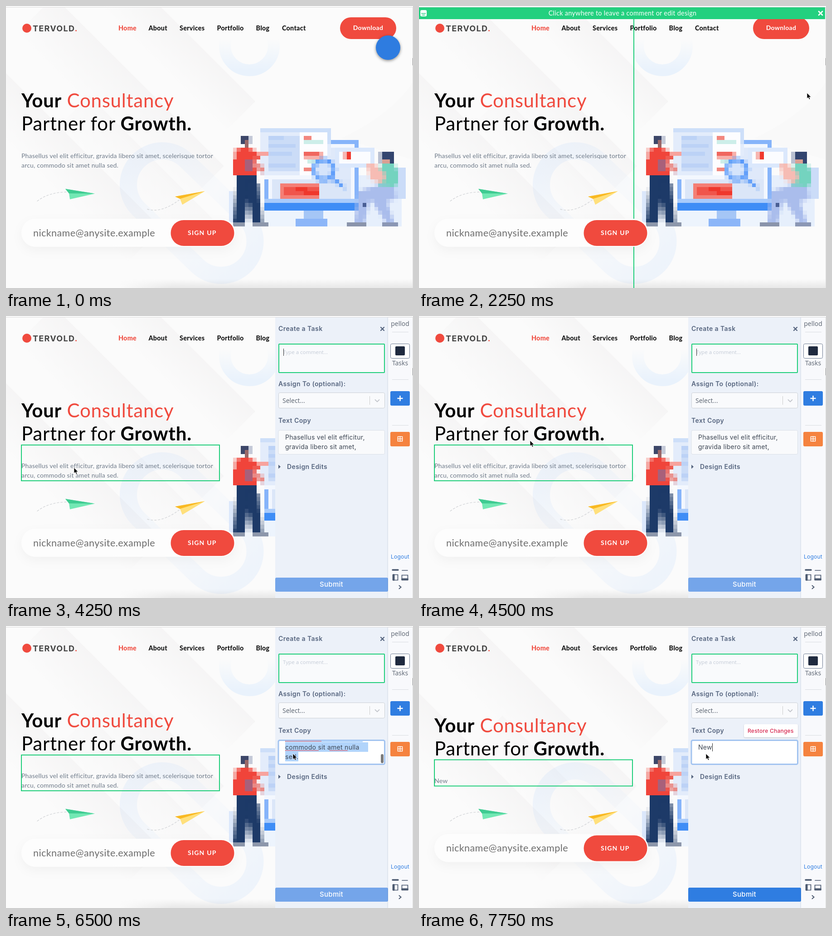
These frames come from a looping animation (898x623 px, 8000 ms). An HTML page with a canvas:

```html
<!DOCTYPE html>
<html lang="en">
<head>
<meta charset="utf-8">
<title>Consultancy page review</title>
<style>
  html, body { margin: 0; width: 100%; height: 100%; overflow: hidden; background: #fbfbfb; }
  #stage { position: absolute; left: 0; top: 0; width: 898px; height: 623px; overflow: hidden; }
  svg, canvas { position: absolute; left: 0; top: 0; }
  canvas { left: 492px; top: 270px; width: 390px; height: 216.67px; image-rendering: pixelated; }
  text { font: 14px Lato, sans-serif; letter-spacing: .02em; white-space: pre; }
  .bold { font-weight: 700; }
  .nav text { font-weight: 800; font-size: 14.3px; fill: #111; }
  .title { font-size: 42px; letter-spacing: .018em; fill: #000; }
  .para { letter-spacing: .014em; fill: #6f7b8a; }
  .ui { font: 14px Inter, sans-serif; letter-spacing: .02em; fill: #3d4653; }
  .label { font: 600 14px Inter, sans-serif; letter-spacing: .03em; fill: #56657f; }
  .plain { font: 14px "Open Sans", sans-serif; letter-spacing: 0; fill: #59626f; }
  .line { fill: none; stroke-linecap: round; }
  .green { fill: none; stroke: #1fce7a; stroke-width: 2; }
</style>
</head>
<body>
<div id="stage">
  <svg width="898" height="623">
    <defs>
      <linearGradient id="fade" x2="0" y2="1">
        <stop stop-color="#85757c" stop-opacity=".045"/><stop offset="1" stop-color="#85757c" stop-opacity="0"/>
      </linearGradient>
      <linearGradient id="rise" x2="0" y2="1">
        <stop offset=".35" stop-color="#e9f2fc" stop-opacity="0"/><stop offset="1" stop-color="#e9f2fc"/>
      </linearGradient>
      <linearGradient id="ends">
        <stop stop-color="#ebf2fb"/><stop offset=".5" stop-color="#ebf2fb" stop-opacity=".25"/>
        <stop offset="1" stop-color="#ebf2fb"/>
      </linearGradient>
      <linearGradient id="floor" x2="0" y2="1">
        <stop stop-color="#999" stop-opacity="0"/><stop offset="1" stop-color="#999" stop-opacity=".2"/>
      </linearGradient>
      <linearGradient id="floorEdge">
        <stop stop-color="#fbfbfb"/><stop offset="1" stop-color="#fbfbfb" stop-opacity="0"/>
      </linearGradient>
    </defs>
    <rect width="898" height="623" fill="#fbfbfb"/>
    <g class="line">
      <circle cx="537" cy="88" r="54" stroke="url(#rise)" stroke-width="26"/>
      <rect x="-75" y="-75" width="330" height="150" rx="75" stroke="url(#ends)" stroke-width="38"
        opacity=".8" transform="translate(345 395) rotate(44)"/>
    </g>
    <g transform="rotate(45)" fill="url(#fade)">
      <rect x="0" y="-240" width="538" height="95"/>
      <rect x="60" y="-90" width="530" height="120"/>
      <rect x="90" y="105" width="500" height="110"/>
      <rect x="270" y="10" width="390" height="100" opacity=".7"/>
    </g>
    <path d="M898 168Q850 240 740 292L898 340Z" fill="#85809a" opacity=".018"/>
    <rect x="250" y="603" width="648" height="20" fill="url(#floor)"/>
    <rect x="249" y="603" width="120" height="20" fill="url(#floorEdge)"/>
    <rect width="898" height="2" fill="#fff"/>
    <path d="M0 2.5H898" stroke="#d9d9d9"/>

    <circle cx="46" cy="49" r="10" fill="#f04a3e"/>
    <text x="59" y="56" style="font:700 18px Inter,sans-serif;letter-spacing:1.3px" fill="#444">TERVOLD<tspan fill="#f04a3e">.</tspan></text>
    <g class="nav" id="nav"></g>
    <rect x="737" y="25" width="124" height="48" rx="24" fill="#f04a3e"/>
    <text class="bold" x="799" y="53" text-anchor="middle" fill="#fff">Download</text>

    <g id="heading">
      <text class="title" x="34" y="224"><tspan class="bold">Your</tspan> <tspan fill="#f04a3e">Consultancy</tspan></text>
      <text class="title" x="34" y="275">Partner for <tspan class="bold">Growth.</tspan></text>
    </g>
    <text class="para" id="para1" x="34" y="336"></text>
    <text class="para" id="para2" x="34" y="357">arcu, commodo sit amet nulla sed.</text>

    <g class="line" stroke="#d3d5d8" stroke-width="1.3" stroke-dasharray="4 4">
      <path d="M69 431Q95 411 135 411"/><path d="M312 449Q344 458 384 427"/>
    </g>
    <path d="M131 404L196 414.500L141 427L139 414Z" fill="#72e8b4"/>
    <path d="M131 404L196 414.500L139 414Z" fill="#3fcb92"/>
    <path d="M373 421L439 409L389 439L384 426Z" fill="#ffe07c"/>
    <path d="M373 421L439 409L384 426Z" fill="#f9b923"/>
    <path id="split" d="M474 29V623" class="green"/>
  </svg>

  <canvas id="mosaic" width="45" height="25"></canvas>

  <svg width="898" height="623">
    <g id="form">
      <rect x="34" y="470" width="472" height="62" rx="31" fill="#fdfdfd" style="filter:drop-shadow(0 8px 11px rgba(0,0,0,.04))"/>
      <rect x="363.500" y="473" width="140" height="57" rx="28.500" fill="#f04a3e"/>
      <text x="60" y="508.500" style="font-size:21.500px" fill="#6c6c6c">nickname@anysite.example</text>
      <text class="bold" x="401" y="506" style="letter-spacing:1.200px" fill="#fff">SIGN UP</text>
    </g>
    <rect id="outline" class="green" x="34" width="437"/>

    <g id="banner">
      <rect y="3" width="896" height="26" fill="#23d07f"/>
      <text x="449" y="21" text-anchor="middle" style="font-size:14.400px" fill="#fff">Click anywhere to leave a comment or edit design</text>
      <rect x="3" y="9" width="14" height="14" rx="3" fill="#fff"/>
      <path d="M5 16.500H15M7 20H13" stroke="#23d07f" stroke-width="1.500"/>
      <path d="M882 12L890 20M890 12L882 20" class="line" stroke="#fff" stroke-width="2.800"/>
    </g>

    <g id="panel">
      <rect x="594" y="3" width="249" height="620" fill="#ecf1f9"/>
      <text class="label" x="601" y="33">Create a Task</text>
      <path d="M827 25L834 32M834 25L827 32" class="line" stroke="#56657f" stroke-width="2.400"/>
      <rect class="green" x="602" y="62" width="233" height="63" rx="1" style="fill:#f9fafc"/>
      <text class="plain" x="611" y="84" style="font-size:11.600px;fill:#c3cad6">Type a comment...</text>
      <path id="commentCaret" d="M612.500 72V88" stroke="#333"/>
      <text class="label" x="601" y="155">Assign To (optional):</text>
      <rect x="601.500" y="169.500" width="234" height="34" rx="3" fill="#f9fafc" stroke="#ccd0d6"/>
      <text class="plain" x="610" y="192">Select...</text>
      <path d="M802.500 177V196" stroke="#ccc"/>
      <path d="M814.500 185L819 189.500L823.500 185" class="line" stroke="#c3c6cc" stroke-width="1.800"/>
      <text class="label" x="601" y="236">Text Copy</text>
      <g id="restore">
        <rect x="717" y="217" width="119" height="29" rx="3" fill="#fff" style="filter:drop-shadow(0 1px 1px rgba(0,0,0,.2))"/>
        <text class="ui" x="725" y="236" style="font-size:12px;font-weight:500;letter-spacing:.02em;fill:#d6254d">Restore Changes</text>
      </g>
      <rect id="copyBox" x="601" y="252.500" width="234.500" height="53" rx="3"/>
      <g id="selection" fill="#b1d4fb">
        <path id="selectTop" d="M616 253H787V256.500H616Z"/>
        <rect x="616" y="257" width="183" height="21"/>
        <rect id="selectLow" x="616" y="278" height="21"/>
      </g>
      <text class="ui" id="copy1" x="616" y="273"></text>
      <text class="ui" id="copy2" x="616" y="294"></text>
      <path id="spelling" class="line" stroke="#e5484d" stroke-width="2" stroke-dasharray="0.1 3"/>
      <path id="copyCaret" d="M647.500 259V277" stroke="#222"/>
      <rect id="thumb" x="827" y="283" width="6" height="20" rx="3" fill="#7b7b7b"/>
      <path d="M601 328.500L606 333L601 337.500Z" fill="#56657f"/>
      <text class="label" x="620" y="338">Design Edits</text>
      <rect id="submit" x="594" y="578" width="249" height="31" rx="3"/>
      <text class="ui" x="718" y="598" text-anchor="middle" style="font-size:15px;font-weight:500;fill:#fff">Submit</text>
    </g>

    <g id="side">
      <rect x="843" y="3" width="55" height="620" fill="#f8f9fc" style="filter:drop-shadow(-1px 0 1px rgba(60,70,110,.13))"/>
      <text class="plain" x="869.500" y="22" text-anchor="middle">pellod</text>
      <path d="M852 35.500H888M852 140.500H888M852 241.500H888" stroke="#d9dce1"/>
      <rect x="848.500" y="61.500" width="42" height="32" rx="3" fill="#fff" stroke="#6d7b92"/>
      <rect x="859" y="67" width="21" height="20" rx="2" fill="#1f2a3f"/>
      <text class="plain" x="869.500" y="109" text-anchor="middle">Tasks</text>
      <rect x="848" y="166" width="43" height="32" rx="3" fill="#2f7de1"/>
      <path d="M863.500 182H875.500M869.500 176V188" stroke="#fff" stroke-width="2.400"/>
      <rect x="848" y="256" width="43" height="32" rx="3" fill="#f5833f"/>
      <path d="M864.500 266.500H874.500V276.500H864.500ZM869.500 266V277M864 271.500H875" class="line" stroke="#fff" stroke-width="1.500"/>
      <text class="ui" x="869.500" y="536" text-anchor="middle" style="font-size:12px;fill:#2f7de1">Logout</text>
      <g class="line" stroke="#4c5a70" stroke-width="1.700">
        <path d="M853 561H865" stroke-width="3.400"/><path d="M874 562H886"/>
        <path d="M853.500 571.500H864.500V583.500H853.500Z"/><path d="M855.500 572V583" stroke-width="4"/>
        <path d="M873.500 572.500H886.500V583.500H873.500Z"/><path d="M874 581.500H886" stroke-width="4"/>
        <path d="M867.500 595.500L871.500 599L867.500 602.500" stroke-width="2"/>
      </g>
    </g>
    <circle id="launcher" cx="843" cy="92" r="27" fill="#2e7ce0" style="filter:drop-shadow(0 2px 3px rgba(0,0,0,.45))"/>
    <path d="M897.500 3V623" stroke="#dedede"/><path d="M897.500 115V131" stroke="#8d8d8d"/>
    <path id="cursor" d="M0 0V12.500L2.900 9.900L5 14.500L7.100 13.500L5.100 9.200H9Z" fill="#000" stroke="#fff" stroke-width=".8"/>
  </svg>
</div>

<script>
const LOOP = 8000;
const $ = id => document.getElementById(id);
const show = (id, on) => { $(id).style.display = on ? '' : 'none'; };
const set = (id, attrs) => { for (const k in attrs) $(id).setAttribute(k, attrs[k]); };

const links = { Home: 248, About: 314.5, Services: 383, Portfolio: 465.5, Blog: 551.5, Contact: 609 };
for (const [name, x] of Object.entries(links)) {
  const link = document.createElementNS('http://www.w3.org/2000/svg', 'text');
  link.textContent = name;
  link.setAttribute('x', x);
  link.setAttribute('y', 54);
  if (name === 'Home') link.style.fill = '#f04a3e';
  $('nav').append(link);
}

// Simple shapes on a coarse grid, enlarged without smoothing.
function drawMosaic() {
  const c = $('mosaic').getContext('2d');
  const box = (color, ...r) => { c.fillStyle = color; c.fillRect(...r); };
  const poly = (color, ...points) => {
    c.fillStyle = color;
    c.beginPath();
    points.forEach(p => c.lineTo(...p));
    c.fill();
  };

  // monitor
  box('#edf4fd', 9, 21, 25, 4);
  box('#e6effc', 33, 12, 11, 13);
  box('#cbdcf8', 42, 10, 3, 8);
  box('#f3f7fe', 9, 4, 24, 14);
  box('#dfe9fa', 25, 5, 6, 8);
  box('#dbe6f8', 11, 13, 20, 5);
  box('#86b4fa', 25, 3, 8, 1);
  box('#86b4fa', 32, 3, 1, 15);
  box('#86b4fa', 9, 13, 1, 5);
  box('#a9cbfb', 9, 18, 24, 1);
  box('#3f8df6', 9, 19, 24, 2);
  box('#a5c6f6', 19, 21, 5, 2);
  box('#8cb6f8', 17, 23, 8, 2);
  box('#f47f76', 13, 14, 10, 4);
  box('#f0554b', 14, 15, 9, 2);
  box('#ef372c', 17, 15, 3, 1);
  box('#ef372c', 19, 16, 4, 1);

  // document
  box('#e3ecfb', 8, 0, 18, 12);
  box('#cddff9', 8, 0, 18, 1);
  box('#cddff9', 25, 1, 1, 3);
  box('#cbdcf7', 10, 2, 8, 9);
  [[2, 4], [4, 7], [6, 6], [9, 7]].forEach(([y, w]) => box('#bcd2f6', 10, y, w, 1));
  box('#fdfdff', 18, 1, 7, 11);
  box('#f2877f', 19, 2, 2, 1);
  box('#cdeee9', 19, 3, 5, 1);
  box('#f7b0aa', 19, 6, 5, 2);
  box('#f0675e', 19, 6, 4, 1);
  box('#cdeee9', 20, 8, 4, 1);
  box('#f2877f', 19, 10, 2, 1);

  // card and magnifier
  box('#dbe8fc', 27, 5, 10, 5);
  box('#fbfcff', 28, 6, 8, 3);
  box('#f6b6b1', 29, 6, 2, 2);
  box('#f0392e', 30, 6, 1, 2);
  c.strokeStyle = '#5598fa';
  c.fillStyle = '#d5e4fb';
  c.lineWidth = 1;
  c.beginPath();
  c.arc(24.1, 10.6, 2.6, 0, 7);
  c.fill();
  c.stroke();
  c.beginPath();
  c.moveTo(26, 12.5);
  c.lineTo(29.3, 15);
  c.stroke();

  // standing figure
  box('#dbe7fb', 0, 16, 1, 8);
  box('#c5cad8', 3, 2, 3, 2);
  box('#3d4769', 3, 2, 2, 2);
  box('#9a6767', 4, 3, 1, 3);
  poly('#f0443a', [1, 6], [3, 5], [5, 5], [7, 6], [7, 12], [1, 12]);
  box('#f4a7a2', 1, 6, 1, 2);
  box('#f7a39d', 7, 6, 3, 1);
  box('#ef5a50', 6, 7, 2, 1);
  poly('#e98a86', [6, 8], [9, 10], [9, 11.5], [6, 10]);
  box('#a8607a', 4, 8, 2, 3);
  box('#1d3a68', 2, 12, 5, 4);
  poly('#1d3a68', [2, 15], [5.5, 15], [4, 24], [1, 24]);
  poly('#1d3a68', [4, 13], [7.5, 14], [8.5, 24], [6, 24]);
  box('#8d97ab', 1, 24, 3, 1);
  box('#8d97ab', 6, 24, 4, 1);

  // seated figure
  box('#b9c0d1', 38, 6, 4, 3);
  box('#33456f', 39, 6, 3, 3);
  box('#d9a093', 39, 8, 2, 1);
  poly('#74d3bf', [39, 9], [42, 9], [43, 11], [43, 14], [42, 15], [38, 15], [38, 11]);
  poly('#f6bcb4', [35, 9], [37, 9], [40, 12], [39, 14], [36, 13]);
  poly('#aabdec', [33, 16], [38, 14.5], [42, 15], [42.5, 18], [39, 19], [36, 18], [34.5, 24], [32, 24]);
  poly('#aabdec', [36, 18], [40, 18], [42, 24], [40, 24]);
  box('#4a5f95', 34, 19, 1, 1);
  box('#8a94ab', 30, 24, 5, 1);
  box('#8b97b5', 39, 24, 4, 1);
}

// Each step holds until the next and changes only what it names.
const steps = [
  { t: 0, launcher: 1, cursor: null, side: null, panel: null, banner: 0, split: 0, outline: 0,
    focus: 0, select: 0, typed: '', caret: 0 },
  { t: 250, cursor: [838, 99] },
  { t: 500, launcher: 0, side: 36, cursor: [842, 103] },
  { t: 750, side: 10, cursor: [843, 105] },
  { t: 1000, side: 0 },
  { t: 1250, cursor: [855, 140] },
  { t: 1500, cursor: [868, 183] },
  { t: 1750, side: null, banner: 1 },
  { t: 2000, cursor: [866, 187] },
  { t: 2250, split: 1, cursor: [856, 192] },
  { t: 2500, split: 0, cursor: [420, 203] },
  { t: 2750, cursor: [265, 262] },
  { t: 3000, outline: 1, cursor: [160, 328] },
  { t: 3250, cursor: [132, 343] },
  { t: 4000, banner: 0, side: 0, panel: 160 },
  { t: 4250, panel: 0, cursor: [150, 335] },
  { t: 4500, cursor: [245, 275] },
  { t: 4750, cursor: [500, 268] },
  { t: 5000, cursor: [690, 281] },
  { t: 5250, focus: 1, cursor: [655, 283] },
  { t: 5500, cursor: [633, 282] },
  { t: 6250, select: 1 },
  { t: 6500, select: 2 },
  { t: 7000, select: 0, typed: 'N' },
  { t: 7250, typed: 'Ne' },
  { t: 7500, typed: 'New' },
  { t: 7750, caret: 1 }
];

const slide = (id, dx) => {
  show(id, dx !== null);
  set(id, { transform: `translate(${dx || 0} 0)` });
};

function render(s) {
  const edited = s.typed !== '';
  const scrolled = s.select === 2;
  const shift = edited ? 10.5 : 0;

  ['launcher', 'banner', 'split', 'outline', 'cursor'].forEach(id => show(id, s[id]));
  if (s.cursor) set('cursor', { transform: `translate(${s.cursor})` });
  slide('side', s.side);
  slide('panel', s.panel);

  set('heading', { transform: `translate(0 ${shift})` });
  set('form', { transform: `translate(0 ${-shift})` });
  set('outline', { y: 285 + shift, height: 79 - 2 * shift });
  set('para1', { y: 336 + shift });
  $('para1').textContent = s.typed ||
    'Phasellus vel elit efficitur, gravida libero sit amet, scelerisque tortor';
  show('para2', !edited);

  show('commentCaret', !s.focus);
  show('restore', edited);
  show('copyCaret', s.caret);
  set('copyBox', s.focus
    ? { fill: '#fff', stroke: '#a3c4f0', 'stroke-width': 3 }
    : { fill: '#f9fafc', stroke: '#dbe0e8', 'stroke-width': 1 });
  $('copy1').textContent = s.typed || (scrolled ? 'commodo sit amet nulla' : 'Phasellus vel elit efficitur,');
  $('copy2').textContent = edited ? '' : scrolled ? 'sed.' : 'gravida libero sit amet,';
  show('selection', s.select);
  show('selectTop', scrolled);
  set('selectLow', { width: scrolled ? 29 : 168 });
  show('spelling', s.focus && !edited);
  set('spelling', { d: scrolled
    ? 'M617 254.500H697M617 275H691M715 275H753'
    : 'M617 275H681M733 275H787M617 297H663' });
  show('thumb', scrolled);
  set('submit', { fill: edited ? '#2f7de1' : '#74a5ea' });
}

let shown = -1;
function tick() {
  const t = performance.now() % LOOP;
  const count = steps.filter(step => step.t <= t).length;
  if (count !== shown) {
    shown = count;
    render(Object.assign({}, ...steps.slice(0, count)));
  }
  requestAnimationFrame(tick);
}

drawMosaic();
tick();
</script>
</body>
</html>
```
